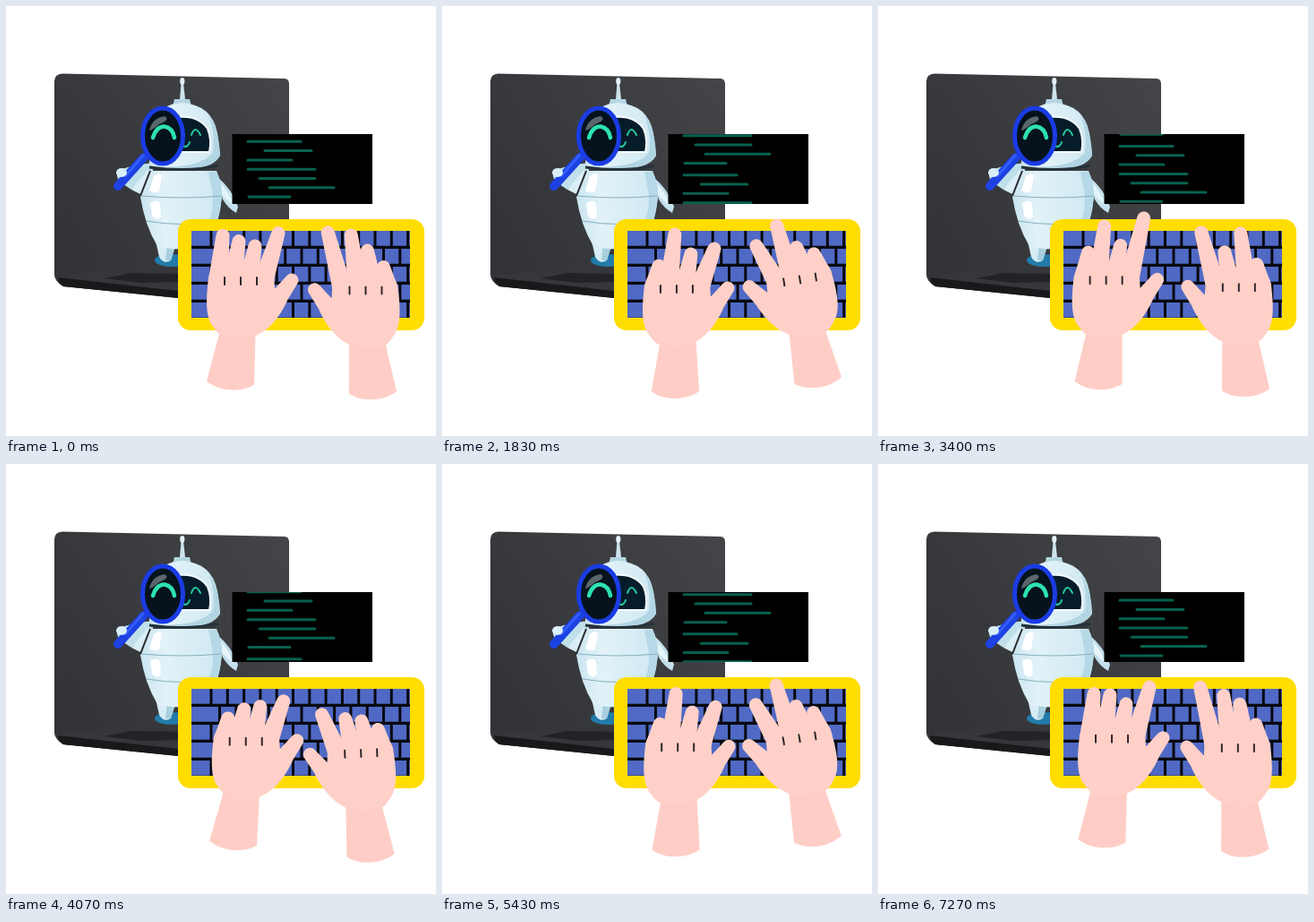
Write an HTML page that moves like this. It is 480x480 px and loops after 7.31 s.

```html
<!DOCTYPE html>
<html lang="en">
<head>
<meta charset="utf-8">
<title>Robot and typing hands</title>
<style>
html, body { margin: 0; width: 100%; height: 100%; overflow: hidden; background: #fff; }
svg { display: block; width: 100vw; height: 100vh; }
</style>
</head>
<body>
<svg id="stage" viewBox="0 0 480 480">
  <defs>
    <linearGradient id="screen" x1="0" y1=".6" x2="1" y2="0">
      <stop offset="0" stop-color="#333437"/><stop offset="1" stop-color="#444549"/>
    </linearGradient>
    <linearGradient id="shell" x1="0" x2="1">
      <stop offset="0" stop-color="#c9e5f0"/><stop offset=".3" stop-color="#e2f2f8"/><stop offset="1" stop-color="#cfe8f2"/>
    </linearGradient>
    <clipPath id="panel"><rect x="252.500" y="143" width="156.500" height="78"/></clipPath>
  </defs>

  <g id="laptop">
    <path d="M54 84Q54 76 63 75.500L311 81Q316 81.500 316 87V250H192V326L64 313Q54 307 54 300Z" fill="url(#screen)"/>
    <path d="M56 302L130 293H200V326L64 313Q57 309 56 302Z" fill="#36373a"/>
    <path d="M110 304L140 298L196 299V308L150 309Z" fill="#222326"/>
    <path d="M58 303L192 318V326L64 313Q58 309 58 303Z" fill="#19191c"/>
  </g>

  <g id="robot">
    <ellipse cx="185" cy="284" rx="19" ry="7" fill="#227ba8"/>
    <path d="M235 190Q253 205 259 224L257 231Q248 226 242 216Z" fill="#c3e0ec"/>
    <path d="M237 195Q250 208 254 223L242 212Z" fill="#e5f4f9"/>
    <path d="M164 175Q144 177 126 183Q121 190 128 197L140 205Q152 192 164 185Z" fill="#bfdfeb"/>
    <path d="M158 183L140 205L152 211L161 185Z" fill="#d9eef6"/>
    <path d="M167 262H190L184 284Q176 289 171 280Z" fill="#d7ecf4"/>
    <path d="M180 266H190L184 284H178Z" fill="#a9cfdf"/>
    <path d="M161 184H235Q242 200 241 213Q238 244 226 265Q200 276 169 268Q155 245 150 213Q153 196 161 184Z" fill="url(#shell)"/>
    <path d="M226 185H235Q242 200 241 213Q238 244 226 265L212 268Q232 240 231 212Z" fill="#b5d9e7"/>
    <path d="M150 212Q197 216 241 212M157 240Q197 247 234 240" fill="none" stroke="#86afbe"/>
    <path d="M161 184L150 212" stroke="#27292d" stroke-width="2"/>
    <path d="M165 190Q170 185 174 189L171 207Q165 210 160 206Z" fill="#fff"/>
    <path d="M161 220Q167 215 172 220L173 235Q168 241 163 234Z" fill="#fff"/>
    <path d="M194 104L195.500 86L198 86L200 104Z" fill="#cde4ed"/>
    <ellipse cx="196.800" cy="84" rx="2.600" ry="4" fill="#e4f3f8"/>
    <path d="M188 104H205L207 112H186Z" fill="#b5d5e2"/>
    <path d="M160 178V142Q162 111 196 108Q230 110 236 142L239 167Q231 181 205 181H166Z" fill="url(#shell)"/>
    <path d="M226 121Q238 137 239 167Q231 181 205 181L180 180Q222 178 231 163Q234 142 226 121Z" fill="#b2d6e4"/>
    <path d="M160 180Q205 186 237 178" fill="none" stroke="#26333b" stroke-width="3"/>
    <path d="M186 125Q213 120 225 137Q230 149 227 163H187Z" fill="#071c2a" stroke="#f3fbfd" stroke-width="2"/>
    <path d="M207 144Q211 132 217 144M197 156Q203 159 205 152" fill="none" stroke="#23c9a0" stroke-width="2" stroke-linecap="round"/>
    <path d="M154 169L125 201" stroke="#1c42e2" stroke-width="10" stroke-linecap="round"/>
    <path d="M153 167L133 190" stroke="#355dff" stroke-width="3" stroke-linecap="round"/>
    <ellipse cx="175" cy="145" rx="22.500" ry="31" fill="#06131d" stroke="#1a3ce4" stroke-width="5"/>
    <path d="M160 139Q163 125 177 123Q184 127 171 132Q163 139 160 139Z" fill="#59666a"/>
    <path d="M164 147Q168 134 177 134.500Q186 136 188 147" fill="none" stroke="#2de2ae" stroke-width="4.500" stroke-linecap="round"/>
    <ellipse cx="129" cy="186" rx="6" ry="5" fill="#d9eef6"/>
  </g>

  <rect x="252.500" y="143" width="156.500" height="78"/>
  <g clip-path="url(#panel)">
    <g id="code" stroke="#08604f" stroke-width="3" stroke-linecap="round"></g>
  </g>

  <rect x="192" y="238" width="275" height="124" rx="14" fill="#ffdd00"/>
  <rect x="207" y="251" width="244" height="97" fill="#08090f"/>
  <g id="keys" fill="#5069c4"></g>
  <g id="hands"></g>
</svg>
<script>
const PERIOD = 3655;
const LINE_STEP = 75;
const get = id => document.getElementById(id);

function add(parent, tag, attrs = {}) {
  const node = document.createElementNS('http://www.w3.org/2000/svg', tag);
  for (const name in attrs) node.setAttribute(name, attrs[name]);
  return parent.appendChild(node);
}

// Code lines: indent and length, repeated down the scroll
const codeLines = [[0, 59], [19, 52], [0, 49], [0, 75], [13, 62], [24, 72], [1, 46]];
for (let copy = 0; copy < 3; copy++) {
  codeLines.forEach(([indent, length], i) => {
    const x1 = 270 + indent, y = 151.3 + 10.3 * i + copy * LINE_STEP;
    add(get('code'), 'line', { x1, x2: x1 + length, y1: y, y2: y });
  });
}

// Staggered keyboard rows
for (let row = 0; row < 5; row++) {
  let width = row % 2 ? 33 : 23.5;
  for (let x = 207; x < 451; x += width, width = 18.3) {
    add(get('keys'), 'rect', { x, y: 251 + row * 20, width: Math.min(width - 3, 451 - x), height: 16.7 });
    if (x > 207) width = 18.3;
    else add(get('keys'), 'g');
  }
}

// Periodic sway: mean, cosine, sine and double-speed cosine parts
function sway(turn, [mean, cos, sin, cos2 = 0]) {
  const a = 2 * Math.PI * turn;
  return mean + cos * Math.cos(a) + sin * Math.sin(a) + cos2 * Math.cos(2 * a);
}

// Smooth bump around each tap time, in turns of the loop
function lift(turn, taps) {
  const bump = tap => {
    const away = Math.abs(turn - tap - Math.round(turn - tap));
    return away < 0.1 ? (1 + Math.cos(10 * Math.PI * away)) / 2 : 0;
  };
  return Math.max(...taps.map(bump));
}

function fingerPath(bx, by, tx, ty, wide = 11, slim = 7.5) {
  const length = Math.hypot(tx - bx, ty - by);
  const nx = (ty - by) / length, ny = (bx - tx) / length;
  const point = (x, y, r) => `${(x + nx * r).toFixed(2)} ${(y + ny * r).toFixed(2)}`;
  return `M${point(bx, by, wide)}L${point(tx, ty, slim)}A${slim} ${slim} 0 0 1 ${point(tx, ty, -slim)}L${point(bx, by, -wide)}Z`;
}

// Pinky to index: knuckle x, tip x and resting height
const fingerShapes = [[-25, -20, 26], [-9, -2, 36], [9, 16, 39], [26, 42, 45]];
const TAP_LIFT = 25;

function makeHand({ side, x, y, palmTilt, armTilt, taps }) {
  const group = add(get('hands'), 'g', { fill: '#ffd0c8' });
  const arm = add(group, 'path', { d: 'M-22 48L-40 111C-25 124 0 124 13 116L16 48Z', fill: '#fecec6' });
  const palm = add(group, 'g');
  const fingers = fingerShapes.map(() => add(palm, 'path'));
  add(palm, 'path', { d: 'M-36 -4C-38 15 -41 40 -30 52Q-25 60 -18 63Q0 67 17 61Q38 52 52 22L38 8L37 -8Q10 -16 4 -22Q-30 -28 -36 -4Z' });
  add(palm, 'path', { d: fingerPath(35, 28, 57, -1) });
  add(palm, 'path', {
    d: 'M-18 -4V4M0 -4V4M18 -4V4',
    stroke: '#30262a', 'stroke-width': 2, 'stroke-linecap': 'round'
  });

  return turn => {
    const place = tilt => `translate(${sway(turn, x)} ${sway(turn, y)}) rotate(${sway(turn, tilt)}) scale(${side} 1)`;
    arm.setAttribute('transform', place(armTilt));
    palm.setAttribute('transform', place(palmTilt));
    fingerShapes.forEach(([knuckle, tip, rest], i) => {
      const height = rest + TAP_LIFT * lift(turn, taps[i]);
      fingers[i].setAttribute('d', fingerPath(knuckle, -2, tip, -height));
    });
  };
}

const hands = [
  makeHand({
    side: 1,
    x: [258, 0, 14, 4], y: [311.5, -4.5, 2.5],
    palmTilt: [0, 0, 0], armTilt: [-3.5, 2.5, 3],
    taps: [[0], [0.5, 0.94], [0.21, 0.7], [0.29, 0.94]]
  }),
  makeHand({
    side: -1,
    x: [398.5, 1, -5, 2], y: [313.5, 6, 8, -2],
    palmTilt: [-4.7, 4.5, -1.5], armTilt: [-0.3, 3.1, -1],
    taps: [[0.69], [0.94], [0.02, 0.28, 0.5], [0.97]]
  })
];

function draw(time) {
  const turn = time / PERIOD % 1;
  get('code').setAttribute('transform', `translate(0 ${-LINE_STEP * turn})`);
  hands.forEach(update => update(turn));
}

const start = performance.now();
function tick() {
  draw(performance.now() - start);
  requestAnimationFrame(tick);
}
tick();
</script>
</body>
</html>
```
